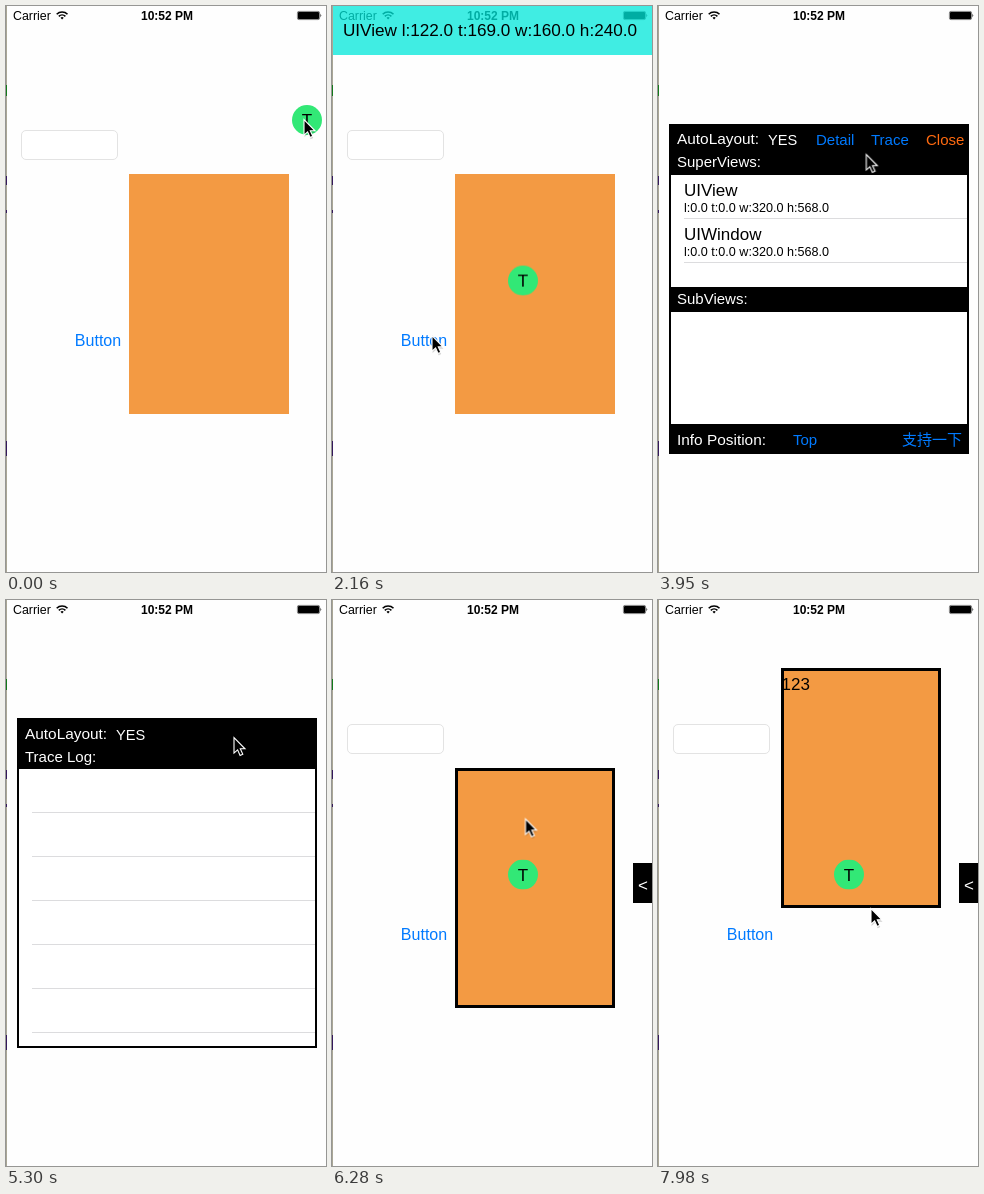
An HTML page for the animation above (8 s loop, 320 px wide and 566 px high).

```html
<!DOCTYPE html>
<html lang="en">
<head>
<meta charset="utf-8">
<title>View inspector demo</title>
<style>
html, body { margin: 0; width: 100%; height: 100%; overflow: hidden; background: #fefefe; }
#stage { position: relative; width: 320px; height: 566px; overflow: hidden; }
#stage > svg { position: absolute; left: 0; top: 0; }
text { font-family: "Liberation Sans", "Noto Sans CJK SC", "Noto Sans CJK", sans-serif; font-size: 15px; }
.mid { text-anchor: middle; }
.big { font-size: 17px; }
.title { font-size: 17.15px; }
.sm { font-size: 12.6px; }
.white { fill: #fff; }
.blue { fill: #007aff; }
.line { fill: #dcdcde; }
.border { fill: none; stroke: #000; stroke-width: 3; }

/* every part runs on the same 8 s clock */
.a { animation: 8s linear infinite; }
.cut { animation-timing-function: step-end; }

#cursor { animation-name: cursor; }
#knob { animation-name: knob; }
#banner { animation-name: banner; }
#rootText, #rootBorder { animation-name: rootHit; }
#boxText { animation-name: boxHit; }
#boxBorder { animation-name: boxBorder; }
#box { animation-name: lift; }
#label { animation-name: label; }
#button { animation-name: press; }

#panel { position: absolute; overflow: hidden; background: #000; animation-name: shrink; }
#panel svg { position: absolute; left: 0; top: 0; }
#wrap { animation-name: open; }
#info { animation-name: info; }
#trace { animation-name: trace; }
#mini { animation-name: mini; }
#log {
  position: absolute; inset: 51px 2px 2px;
  background:
    linear-gradient(#fff, #fff) 0 0 / 13px 100% no-repeat,
    repeating-linear-gradient(#fff 0 43px, #dcdcde 43px 44px);
}

@keyframes cursor {
  0% { transform: translate(298px, 113px); }
  7.6% { transform: translate(298px, 113px); animation-timing-function: ease-in-out; }
  15.25%, 19.3% { transform: translate(188px, 274px); }
  21.75%, 23.75% { transform: translate(107px, 326px); }
  24%, 25.8% { transform: translate(106px, 327px); }
  27% { transform: translate(100px, 329px); }
  31.25% { transform: translate(91px, 332px); }
  34.6% { transform: translate(91px, 332px); animation-timing-function: ease-in-out; }
  37% { transform: translate(122px, 28px); }
  40.7% { transform: translate(122px, 28px); animation-timing-function: ease-in-out; }
  47.1%, 49.3% { transform: translate(208px, 148px); }
  55.9%, 73.1% { transform: translate(228px, 137px); }
  75.5% { transform: translate(247px, 160px); animation-timing-function: ease-in-out; }
  82.9% { transform: translate(91px, 330px); }
  95.7% { transform: translate(91px, 330px); animation-timing-function: ease-in-out; }
  99.75%, 100% { transform: translate(213px, 308px); }
}
@keyframes knob {
  0% { transform: translate(301px, 114px); }
  7.6% { transform: translate(301px, 114px); animation-timing-function: ease-in-out; }
  15.25%, 100% { transform: translate(191px, 274.6px); }
}
@keyframes banner {
  0%, 7.9% { opacity: 0; }
  13% { opacity: 1; }
  40.6% { opacity: 1; animation-timing-function: ease-in-out; }
  47%, 100% { opacity: 0; }
}
@keyframes rootHit { 0% { opacity: 0; } 8% { opacity: 1; } 10.675%, 100% { opacity: 0; } }
@keyframes boxHit { 0% { opacity: 0; } 10.675%, 100% { opacity: 1; } }
@keyframes boxBorder {
  0% { opacity: 0; }
  10.675% { opacity: 1; }
  19.75% { opacity: 0; }
  66.25%, 100% { opacity: 1; }
}
@keyframes lift {
  0% { transform: translateY(168px); }
  86.75% { transform: translateY(168px); animation-timing-function: ease-in-out; }
  99.25%, 100% { transform: translateY(68px); }
}
@keyframes label { 0% { opacity: 0; } 86.6%, 100% { opacity: 1; } }
@keyframes press {
  0%, 85.86% { opacity: 1; }
  85.87%, 86.56% { opacity: .2; }
  90%, 100% { opacity: 1; }
}
@keyframes open { 0% { opacity: 0; } 40.74%, 100% { opacity: 1; } }
@keyframes info { 0% { opacity: 1; } 66.25%, 100% { opacity: 0; } }
@keyframes trace { 0% { opacity: 0; } 66.25% { opacity: 1; } 69.75%, 100% { opacity: 0; } }
@keyframes mini { 0% { opacity: 0; } 69.75%, 100% { opacity: 1; } }
@keyframes shrink {
  0% { left: 11px; top: 118px; width: 300px; height: 330px; }
  66.3% { left: 11px; top: 118px; width: 300px; height: 330px; animation-timing-function: ease-in-out; }
  70%, 100% { left: 301px; top: 263px; width: 20px; height: 40px; }
}
</style>
</head>
<body>
<div id="stage">
  <svg width="320" height="566">
    <rect width="320" height="566" fill="#fefefe"/>

    <!-- status bar -->
    <text x="7" y="14" style="font-size:12.4px">Carrier</text>
    <g fill="none" stroke="#000" stroke-width="1.6">
      <path d="M50.7 8.2a7.6 7.6 0 0 1 10.8 0M52.8 10.4a4.7 4.7 0 0 1 6.6 0"/>
      <path d="M56.1 13.4l-1.6-1.7a2.4 2.4 0 0 1 3.2 0z" fill="#000" stroke="none"/>
    </g>
    <text class="mid" x="161" y="14" style="font-size:12px;font-weight:bold">10:52 PM</text>
    <rect x="291.4" y="5.4" width="22.2" height="8.2" rx="1.5" fill="none" stroke="#000" stroke-width=".5"/>
    <rect x="292" y="6" width="21" height="7" rx=".8"/>
    <path d="M314.5 7.7q1.6 1.8 0 3.6z"/>

    <!-- app content -->
    <rect x="15.5" y="124.5" width="96" height="29" rx="4.5" fill="#fff" stroke="#e3e3e3"/>
    <text id="button" class="a mid blue" x="92" y="340" style="font-size:16px">Button</text>
    <g id="box" class="a">
      <rect x="123" width="160" height="240" fill="#f39a43"/>
      <text id="label" class="a cut big" x="123.5" y="21.5">123</text>
      <rect id="boxBorder" class="a cut border" x="124.5" y="1.5" width="157" height="237"/>
    </g>
    <rect id="rootBorder" class="a cut border" x="2.5" y="1.5" width="316" height="565"/>

    <!-- inspector -->
    <g id="knob" class="a">
      <circle r="15" fill="#32e876"/>
      <text class="mid big" y="6">T</text>
    </g>
    <g id="banner" class="a">
      <rect x="1" width="319" height="49" fill="#00e7da" fill-opacity=".75"/>
      <text id="rootText" class="a cut mid title" x="158" y="30">UIView l:0.0 t:0.0 w:320.0 h:568.0</text>
      <text id="boxText" class="a cut mid title" x="158" y="30">UIView l:122.0 t:169.0 w:160.0 h:240.0</text>
    </g>

    <!-- sliver of desktop on the left -->
    <rect width="1" height="566" fill="#aaa796"/>
    <path d="M0 79h1v11h-1z" fill="#137a1a"/>
    <path d="M0 170h1v9h-1zM0 204h1v3h-1zM0 435h1v15h-1z" fill="#35195c"/>
  </svg>

  <div id="wrap" class="a cut">
    <div id="panel" class="a">
      <div id="info" class="a cut">
        <svg width="300" height="330" viewBox="11 118 300 330">
          <path d="M13 169h296v112h-296zM13 306h296v112h-296z" fill="#fff"/>
          <path class="line" d="M26 212h283v1h-283zM26 256h283v1h-283z"/>
          <text class="white" x="19" y="138" style="font-size:15.4px">AutoLayout:</text>
          <text class="white" x="110" y="139" style="font-size:14.6px">YES</text>
          <text class="blue" x="158" y="139">Detail</text>
          <text class="blue" x="213" y="139">Trace</text>
          <text x="268" y="139" fill="#ff6a10">Close</text>
          <text class="white" x="19" y="161">SuperViews:</text>
          <text class="big" x="26" y="190">UIView</text>
          <text class="sm" x="26" y="206">l:0.0 t:0.0 w:320.0 h:568.0</text>
          <text class="big" x="26" y="234">UIWindow</text>
          <text class="sm" x="26" y="250">l:0.0 t:0.0 w:320.0 h:568.0</text>
          <text class="white" x="19" y="298">SubViews:</text>
          <text class="white" x="19" y="439" style="font-size:15.4px">Info Position:</text>
          <text class="blue" x="135" y="439">Top</text>
          <text class="blue" x="244" y="439">支持一下</text>
        </svg>
      </div>
      <div id="trace" class="a cut">
        <svg width="300" height="51">
          <text class="white" x="8" y="20.5" style="font-size:15.4px">AutoLayout:</text>
          <text class="white" x="99" y="21.5" style="font-size:14.6px">YES</text>
          <text class="white" x="8" y="43.5">Trace Log:</text>
        </svg>
        <div id="log"></div>
      </div>
      <div id="mini" class="a cut">
        <svg width="20" height="40"><text class="mid white big" x="10" y="28">&lt;</text></svg>
      </div>
    </div>
  </div>

  <svg width="320" height="566">
    <g id="cursor" class="a">
      <path d="M.5 2v16l3.6-3.3 2.5 5.6 2.7-1.2-2.5-5.4h4.7z" opacity=".18"/>
      <path d="M0 .5v15.6l3.6-3.3 2.5 5.7 2.7-1.2-2.5-5.5h4.7z" stroke="#fff" stroke-width="1.1"/>
    </g>
  </svg>
</div>
</body>
</html>
```
